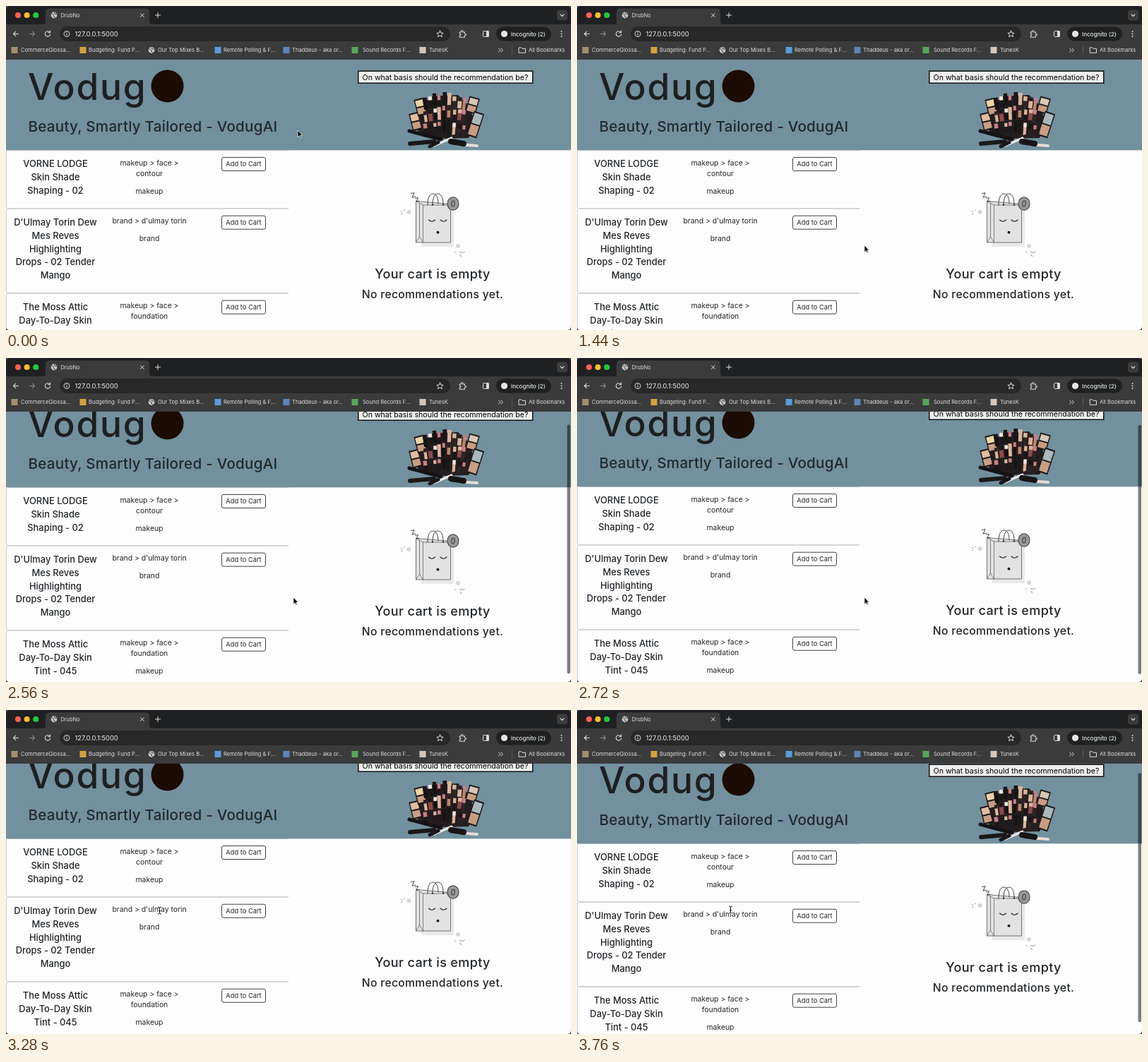
These frames come from a looping animation (800 by 459 pixels, 3.84 s). An HTML page:

```html
<!DOCTYPE html>
<html lang="en">
<head>
<meta charset="utf-8">
<title>Shop recommendations</title>
<style>
html, body { margin: 0; width: 100%; height: 100%; overflow: hidden; background: #555; }
svg { display: block; width: 100vw; height: 100vh; font-family: Inter, "Open Sans", sans-serif; }
</style>
</head>
<body>
<svg id="stage" viewBox="0 0 800 459" preserveAspectRatio="none"></svg>
<script>
const LOOP = 3840, TICK = 80;

// Shape helpers
const rect = (x, y, w, h, fill, more = '') =>
  `<rect x="${x}" y="${y}" width="${w}" height="${h}" fill="${fill}" ${more}/>`;
const disc = (x, y, r, fill, more = '') =>
  `<circle cx="${x}" cy="${y}" r="${r}" fill="${fill}" ${more}/>`;
const line = (d, color, w = 1, more = '') =>
  `<path d="${d}" fill="none" stroke="${color}" stroke-width="${w}" stroke-linecap="round" stroke-linejoin="round" ${more}/>`;
const text = (x, y, str, size, fill, more = '') =>
  `<text x="${x}" y="${y}" font-size="${size}" fill="${fill}" ${more}>${str}</text>`;
const mid = 'text-anchor="middle"';
const medium = 'font-weight="500"';
const spaced = em => `letter-spacing="${em}em"`;

const globe = (x, y) => disc(x, y, 4.4, '#c3c7cb') +
  line(`M${x - 3.2} ${y - 2}q2.4 .4 2.6 2.2t2 3M${x + .6} ${y - 3.6}q-.4 2 2.8 2.4`, '#4a4d50', 1.1);

function browser() {
  const ink = '#dcdcdc', soft = '#8a8a8a';
  let s = rect(0, 0, 800, 27, '#1f2021') + rect(0, 26, 800, 50, '#3b3b3c');
  ['#ff5f57', '#febc2e', '#28c840'].forEach((c, i) => s += disc(17 + 12.6 * i, 13, 4, c));
  s += '<path d="M51 26.5q5 0 5-5V9q0-5.500 5.500-5.500h136q5.500 0 5.500 5.500v12.500q0 5 5 5z" fill="#3b3b3c"/>';
  s += globe(68, 13) + text(77.5, 15.8, 'DrubNo', 7.4, ink);
  s += line('M190.500 10.800l4.600 4.600m0-4.600l-4.600 4.600', ink);
  s += line('M211.500 13h7m-3.500-3.500v7', ink);
  s += rect(780, 5.5, 15, 15, '#3b3b3c', 'rx="4"') + line('M785 12l2.500 2.500 2.500-2.500', ink, 1.1);

  // Toolbar
  s += rect(76, 29, 553, 21, '#282829', 'rx="10.5"');
  s += line('M17.500 39.500h-7m3.200-3.200l-3.200 3.200 3.200 3.200', ink, 1.1);
  s += line('M33.500 39.500h7m-3.200-3.200l3.200 3.200-3.200 3.200', soft, 1.1);
  s += line('M62 37.200a3.700 3.700 0 1 0 .6 3.200M62.500 35v2.700h-2.700', ink, 1.1);
  s += disc(86, 39.5, 4, 'none', `stroke="${ink}"`) + line('M86 39.300v2M86 37.300v.1', ink, 1.1);
  s += text(97.5, 42.9, '127.0.0.1:5000', 9.3, '#eeeeee');
  s += line('M614.500 35l1.300 3 3.300.3-2.500 2.200.8 3.200-2.900-1.700-2.900 1.700.8-3.200-2.500-2.200 3.300-.3z', ink);
  s += line('M642.300 37h2.200q-.3-2.200 1.200-2.200t1.200 2.200h2.500v2.300q2 0 2 1.300t-2 1.300v2.400h-7.100v-2.400q1.700-.2 1.700-1.300t-1.700-1.300z', ink, 1.1);
  s += rect(675.5, 35.5, 8, 8, 'none', `stroke="${ink}" rx="1"`) + rect(680, 35.5, 3.5, 8, ink);
  s += rect(694, 29.5, 78, 20, '#1f2021', 'rx="10"') + disc(705.5, 39.5, 4.6, '#e3e3e3');
  s += text(715, 42.5, 'Incognito (2)', 8, '#e8e8e8', medium);
  [36, 39.5, 43].forEach(y => s += disc(786.5, y, .95, ink));

  // Bookmarks
  const marks = [
    [12, 21, 'CommerceGlossa...', '#a58f6c'], [109, 117, 'Budgeting: Fund P...', '#d3a23c'],
    [206, 215, 'Our Top Mixes B...', ''], [300, 308, 'Remote Polling &amp; F...', '#5b9bd8'],
    [397, 405, 'Thaddeus - aka or...', '#5d84b8'], [494, 505, 'Sound Records F...', '#58a55c'],
    [590, 599, 'TunesK', '#d5c5b8']
  ];
  for (const [ix, x, name, color] of marks) {
    s += color ? rect(ix - 4.5, 58, 9, 9, color) : globe(ix, 62.5);
    s += text(x, 65.3, name, 7.6, ink);
  }
  s += line('M697.500 60l2.500 2.500-2.500 2.500m3.500-5l2.500 2.500-2.500 2.500', ink);
  s += line('M716.500 57v11', '#5c5c5d');
  s += line('M726.500 59h3.300l1.200 1.300h4.500v6h-9z', ink);
  return s + text(740, 65.3, 'All Bookmarks', 7.6, ink);
}

// Flat impression of a cosmetics collection
function cosmetics() {
  let seed = 29, s = '';
  const rnd = () => (seed = seed * 16807 % 2147483647) / 2147483647;
  const bodies = ['#1b1718', '#2c2526', '#d9b59c', '#151213', '#8d4a4c', '#1f1a1b', '#b8836c'];
  const caps = ['#efe4dc', '#1a1617', '#d9b59c', '#241e1f', '#c97f86'];
  const pick = list => list[Math.floor(rnd() * list.length)];
  const palette = (x, y, w, h, a, c) => {
    const t = `transform="rotate(${a} ${x + w / 2} ${y + h / 2})"`;
    s += rect(x, y, w, h, '#1d191b', t) + rect(x + 1.5, y + 2, w - 3, h / 2 - 3, c, t) +
      rect(x + 1.5, y + h / 2 + 1, w - 3, h / 2 - 3, '#c99d83', t);
  };
  s += '<path d="M579 166L588 142 602 128 640 126 656 142 664 166 655 187 612 188 584 178z" fill="#241d1f"/>';
  palette(573, 151, 14, 25, -14, '#e0bda0');
  palette(580, 131, 14, 24, -14, '#ecd3a8');
  palette(653, 129, 15, 23, 16, '#d9c7b4');
  palette(657, 150, 15, 36, 18, '#a9b9bb');
  for (let row = 0; row < 3; row++)
    for (let i = 0; i < 9; i++) {
      const x = 592 + i * 6.4 + rnd() * 2, y = 121 + row * 19 + Math.abs(i - 4) * 1.5 + rnd() * 4;
      const w = 4 + rnd() * 2, h = 15 + rnd() * 6;
      const t = `transform="rotate(${(i - 4) * 2} ${x} ${y + h})"`;
      s += rect(x, y, w, h, pick(bodies), t) + rect(x, y, w, h * .35, pick(caps), t);
    }
  s += line('M571 177L616 189', '#151315', 5) + line('M572 195L606 192', '#1a1819', 6);
  s += line('M606 198L640 183', '#eee7e3', 3.5) + line('M600 199L612 193', '#19171a', 5);
  s += line('M640 196L667 198', '#e6dcd6', 4) + line('M630 192L648 195', '#161416', 8);
  return s + line('M634 185L652 180', '#272022', 5);
}

function bag() {
  const ink = '#555';
  let s = '<path d="M584 284H634V341H588z" fill="#e9e9e9"/>';
  s += `<path d="M580.500 276.500L629.500 280.500V335H580.500z" fill="#e2e2e2" stroke="${ink}" stroke-width=".8"/>`;
  s += line('M580.500 276.500L590.500 282H629.500M590.500 282V335M585.500 279.500V327L580.500 335M585.500 327L590.500 335', ink, .7);
  s += line('M597 282C597 271 600 266 604.500 266S612 271 612 280M604 282C604 271 607 266 611.500 266S619 271 619 280', '#444', 1);
  [604, 619].forEach(x => s += disc(x, 281.5, 1.2, '#333'));
  s += line('M598.500 303q4.500 4.500 9 0M615 303q4.500 4.500 9 0', '#222', 1.1) + disc(611.5, 320.7, 1.9, '#111');
  s += '<ellipse cx="633" cy="280" rx="8" ry="9.300" fill="#999" stroke="#444" stroke-width="1.100"/>';
  s += '<ellipse cx="633" cy="280" rx="2.200" ry="4" fill="none" stroke="#333" transform="rotate(8 633 280)"/>';
  s += line('M573.500 265.500l4.500-.8-3 6.500 4.800-1M579.500 272.300l4-.8-2.500 5.500 4-.8', '#333', .9);
  s += disc(570.5, 292, 3, '#d6d6d6') + disc(640, 340, 3, '#d6d6d6') + disc(636, 349, 1.5, '#dedede');
  return s + line('M559 290.500l1.500 1M559.500 294.500l1.500-.5M563.500 290l.8-1.200M642.500 348.500l4.500 1.200M643 352l1.500 3M648 348.500l1.200-.4', '#888', .9);
}

function card(y, h, name, tags) {
  let s = rect(.5, y + .5, 406, h - .5, '#fdfdfd', 'stroke="#cacaca" rx="3"');
  name.forEach((row, i) => s += text(70, y + 24.3 + 18.75 * i, row, 12.9, '#212529', mid + ' ' + medium));
  tags.forEach(([dy, tag]) => s += text(203, y + dy, tag, 10.4, '#212529', mid));
  s += rect(305.5, y + 10.5, 62, 19, '#fff', 'rx="2.500" stroke="#3c4044"');
  return s + text(336.5, y + 23.3, 'Add to Cart', 9.3, '#212529', mid);
}

function page() {
  let s = rect(0, 70, 800, 460, '#fdfdfd') + '<g clip-path="url(#list)">';
  s += card(204, 82.7, ['VORNE LODGE', 'Skin Shade', 'Shaping - 02'],
    [[21.7, 'makeup &gt; face &gt;'], [36.7, 'contour'], [61.7, 'makeup']]);
  s += card(286.7, 120, ["D'Ulmay Torin Dew", 'Mes Reves', 'Highlighting', 'Drops - 02 Tender', 'Mango'],
    [[21.5, "brand &gt; d'ulmay torin"], [46.5, 'brand']]);
  s += card(406.7, 90, ['The Moss Attic', 'Day-To-Day Skin', 'Tint - 045'],
    [[21.5, 'makeup &gt; face &gt;'], [36.5, 'foundation'], [61.5, 'makeup']]) + '</g>';
  s += rect(0, 40, 800, 164.3, '#72909e');
  s += text(31, 132.5, 'Vodug', 51.5, '#1e1f21', medium + ' ' + spaced(.035));
  s += disc(228.5, 113.5, 23, '#1b0b03');
  s += text(31.5, 178, 'Beauty, Smartly Tailored - VodugAI', 20.6, '#22282d', medium + ' ' + spaced(.012));
  s += rect(498.75, 92.25, 247, 17, '#efefef', 'stroke="#111" stroke-width="1.500"');
  s += text(622, 104.6, 'On what basis should the recommendation be?', 10.6, '#000', mid);
  s += cosmetics() + bag();
  const wide = `${mid} ${medium} ${spaced(.02)}`;
  s += text(604, 386, 'Your cart is empty', 18, '#212529', wide);
  return s + text(604, 414.3, 'No recommendations yet.', 15.7, '#212529', wide);
}

const $ = id => document.getElementById(id);
$('stage').innerHTML = `
  <defs>
    <clipPath id="window"><rect width="800" height="459" rx="5"/></clipPath>
    <clipPath id="view"><rect y="76" width="800" height="383"/></clipPath>
    <clipPath id="list"><rect y="204" width="400" height="300"/></clipPath>
  </defs>
  <g clip-path="url(#window)">
    <g clip-path="url(#view)"><g id="page">${page()}</g></g>
    ${browser()}
    <rect id="bar" x="794.500" width="4.500" height="353" rx="2.200" fill="#000"/>
  </g>
  <path id="arrow" d="M0 0V9.800L2.200 7.800 3.600 11 5.100 10.400 3.700 7.300H6.600Z" fill="#000" stroke="#fff" stroke-width=".7"/>
  <g id="beam">${['#fff', '#111'].map((c, i) =>
    line('M-2 -5Q0 -5 0 -3.500Q0 -5 2 -5M0 -3.500V3.500M-2 5Q0 5 0 3.500Q0 5 2 5M-1 .8H1', c, i ? 1 : 2)).join('')}</g>`;

// Keys are [time, value, ...]; values glide smoothly between them
const pointer = [
  [0, 413, 176], [240, 413, 176], [320, 617, 126.5], [400, 617, 126.5], [800, 408, 337], [1360, 408, 337],
  [1440, 407, 339], [2880, 407, 339], [3040, 322, 315], [3120, 322, 315], [3280, 217.5, 284],
  [3440, 217.5, 284], [3520, 217.5, 283]
];
const scroll = [[2160, 0], [2240, 2], [2320, 10], [2400, 19], [2480, 19], [2560, 21], [2640, 22], [3680, 22], [3760, 15]];
const barFade = [[2160, 0], [2240, .5], [2880, .5], [3200, 0], [3680, 0], [3760, .5]];

function at(keys, t) {
  const n = keys.findIndex(k => k[0] > t);
  if (n < 0) return keys[keys.length - 1].slice(1);
  if (n === 0) return keys[0].slice(1);
  const a = keys[n - 1], b = keys[n], u = (t - a[0]) / (b[0] - a[0]), e = u * u * (3 - 2 * u);
  return a.slice(1).map((v, i) => v + (b[i + 1] - v) * e);
}

function draw(ms) {
  const t = Math.floor(ms % LOOP / TICK) * TICK;
  const [x, y] = at(pointer, t), [top] = at(scroll, t), [fade] = at(barFade, t);
  const overText = t >= 3200;
  $('page').setAttribute('transform', `translate(0 ${-top})`);
  $('bar').setAttribute('y', 77 + top * .82);
  $('bar').setAttribute('opacity', fade);
  for (const [id, on] of [['arrow', !overText], ['beam', overText]]) {
    $(id).setAttribute('transform', `translate(${x} ${y})`);
    $(id).setAttribute('visibility', on ? 'visible' : 'hidden');
  }
}

const start = performance.now();
function loop() {
  draw(performance.now() - start);
  requestAnimationFrame(loop);
}
loop();
</script>
</body>
</html>
```
